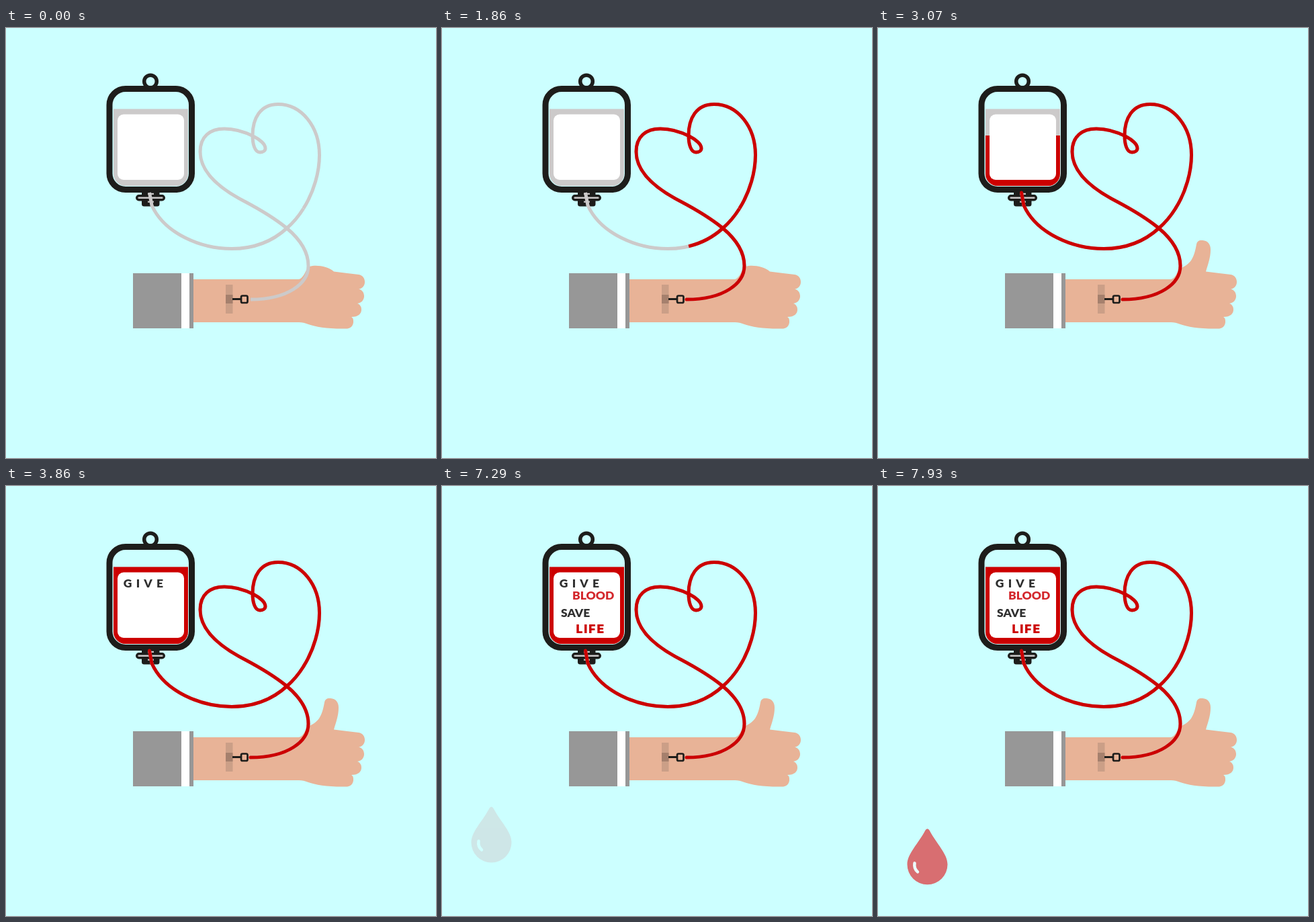
Write an HTML page that moves like this. It is 640 by 640 pixels and loops after 8000 ms.

```html
<!DOCTYPE html>
<html lang="en">
<head>
<meta charset="utf-8">
<title>Give blood, save life</title>
<style>
html, body { margin: 0; width: 100%; height: 100%; overflow: hidden; background: #cff; }
svg { display: block; width: 100%; height: 100%; }
.tube { fill: none; stroke-width: 5; }
.ink { fill: none; stroke: #1d1d1b; }
text { font: 900 17.5px Lato, sans-serif; fill: #303030; }
.red { fill: #d3272c; }
.life { font: 900 17.5px Inter, sans-serif; letter-spacing: 1.9px; fill: #c00; }
</style>
</head>
<body>
<svg viewBox="0 0 640 640">
  <defs>
    <clipPath id="liquid"><path d="M160 120.500H271V217A18 18 0 0 1 253 235H178A18 18 0 0 1 160 217Z"/></clipPath>
  </defs>

  <!-- arm -->
  <path id="hand" fill="#e8b397"/>
  <path fill="#979797" d="M189 365H279V447H189Z"/>
  <path fill="#fff" d="M261 365H273V447H261Z"/>
  <path fill="#cb9f87" d="M327 382H337.500V425H327Z"/>
  <path fill="#a5806d" d="M327 397H337.500V410H327Z"/>
  <path class="ink" stroke-width="3" d="M337 403.500H350"/>
  <rect class="ink" stroke-width="2.700" x="350" y="398.500" width="9.500" height="10.500" rx="2"/>

  <!-- bag -->
  <g clip-path="url(#liquid)">
    <rect x="158" y="120" width="115" height="117" fill="#cccaca"/>
    <rect id="blood" x="158" y="240" width="115" height="120" fill="#c00"/>
  </g>
  <rect x="166" y="128.500" width="99" height="97.500" rx="9" fill="#fff"/>
  <rect class="ink" stroke-width="9" x="154" y="90.500" width="122.500" height="150" rx="24"/>
  <circle class="ink" stroke-width="5.500" cx="215" cy="79.500" r="9.300"/>
  <path fill="#1d1d1b" d="M202 243H228.500V262Q228.500 265.500 225 265.500H205.500Q202 265.500 202 262Z"/>
  <path stroke="#cccaca" stroke-width="2.500" d="M211 247H220M211 258.500H220"/>
  <rect x="194.700" y="249.700" width="40.600" height="6" rx="3" fill="#cccaca" stroke="#1d1d1b" stroke-width="3.400"/>

  <g id="tubes"></g>

  <text x="174.800" y="150.500" letter-spacing="6.200" data-from="54">GIVE</text>
  <text x="194" y="168.700" class="red" data-from="66">BLOOD</text>
  <text x="177" y="195.300" data-from="78">SAVE</text>
  <text x="199.500" y="219" class="life" data-from="91">LIFE</text>

  <g id="drop">
    <path fill="#e0181c" d="M70 3C72 -1 75 -1 77 3C87 22 103.500 37 103.500 53A30 30 0 0 1 43.500 53C43.500 37 60 22 70 3Z"/>
    <path fill="none" stroke="#fff" stroke-width="4.500" stroke-linecap="round" d="M54.500 51C53.500 57 55.500 61 59 64"/>
  </g>
</svg>
<script>
const LOOP = 8000, FPS = 14;
const $ = id => document.getElementById(id);
const clamp = v => Math.max(0, Math.min(1, v));

const palm = 'L525 367C531 368 534 373 534 378C534 384 530 388 525 388.5C531 390 533 395 533 399' +
  'C533 405 529 409 523 410C528 412 529 416 529 419C529 425 525 430 514 430C517 432 517 434 517 437' +
  'C517 443 513 447.500 506 447.500C480 448 461 445 450 441C445 439 441 438 436 438H279Z';
const fist = 'M279 374H436C444 372 446 358 452 355C462 352 480 355 488 362.5' + palm;
const thumbUp = 'M279 374H436C444 372 444 362 452 357C464 351 470 345 474 322C475 317 478 315.500 483 316' +
  'C491 316.500 495 322 495 330C495 342 491 352 488 362.5' + palm;

// Each stretch of tube: path, first step, number of steps, easing.
const linear = p => p;
const slowLoop = p => p < 5 / 12 ? p * 0.588 : 0.245 + (p - 5 / 12) * 0.755 * 12 / 7;
const stretches = [
  ['M364 404C420 404 450 380 450 354C450 332 437 314 418 298C396 280 372 267 355 258' +
   'C318 239 289 214 289 184C289 162 303 150 325 150C340 150 356 155 368 161', 1, 12, linear],
  ['M368 161C378 166 386 173 386 179C386 183 382 185 378 185C370 185 367 172 367 160' +
   'C367 135 378 113.500 405 113.500C440 113.500 466.500 147 466.500 189C466.500 213.500 458.700 243.400 442.700 268.700',
   13, 12, slowLoop],
  ['M442.700 268.700C435.900 279.600 427.600 289.600 418 298C395 319 366 328.500 336 328.500' +
   'C290 328.500 236 306 217 264L213.500 245', 25, 6, linear],
];

function addTube(d, color) {
  const path = document.createElementNS('http://www.w3.org/2000/svg', 'path');
  path.setAttribute('d', d);
  path.setAttribute('class', 'tube');
  path.setAttribute('stroke', color);
  path.setAttribute('pathLength', 1);
  return $('tubes').appendChild(path);
}
stretches.forEach(([d]) => addTube(d, '#cccaca'));
const flows = stretches.map(([d, start, steps, ease]) => ({ path: addTube(d, '#c00'), start, steps, ease }));
const words = [...document.querySelectorAll('text')];
const show = (el, on) => el.style.display = on ? '' : 'none';

function draw(ms) {
  const step = Math.floor((ms % LOOP + 5.1) * FPS / 1000) % 112;

  for (const { path, start, steps, ease } of flows) {
    const p = ease(clamp((step - start + 1) / steps));
    show(path, p > 0);
    path.style.strokeDasharray = p < 1 ? `${p} 2` : 'none';
    path.style.strokeLinecap = p < 1 ? 'butt' : 'round';
  }

  $('hand').setAttribute('d', step < 32 ? fist : thumbUp);
  $('blood').setAttribute('y', 240 - 120 * clamp((step - 33) / 15));
  words.forEach(word => show(word, step >= +word.dataset.from));

  const fall = step - 102;
  show($('drop'), fall >= 0);
  $('drop').setAttribute('transform', `translate(0 ${477.500 + fall * 3.65})`);
  $('drop').setAttribute('opacity', clamp(0.1 + fall * 0.058));
}

const begin = performance.now();
function tick() {
  draw(performance.now() - begin);
  requestAnimationFrame(tick);
}
tick();
</script>
</body>
</html>
```
